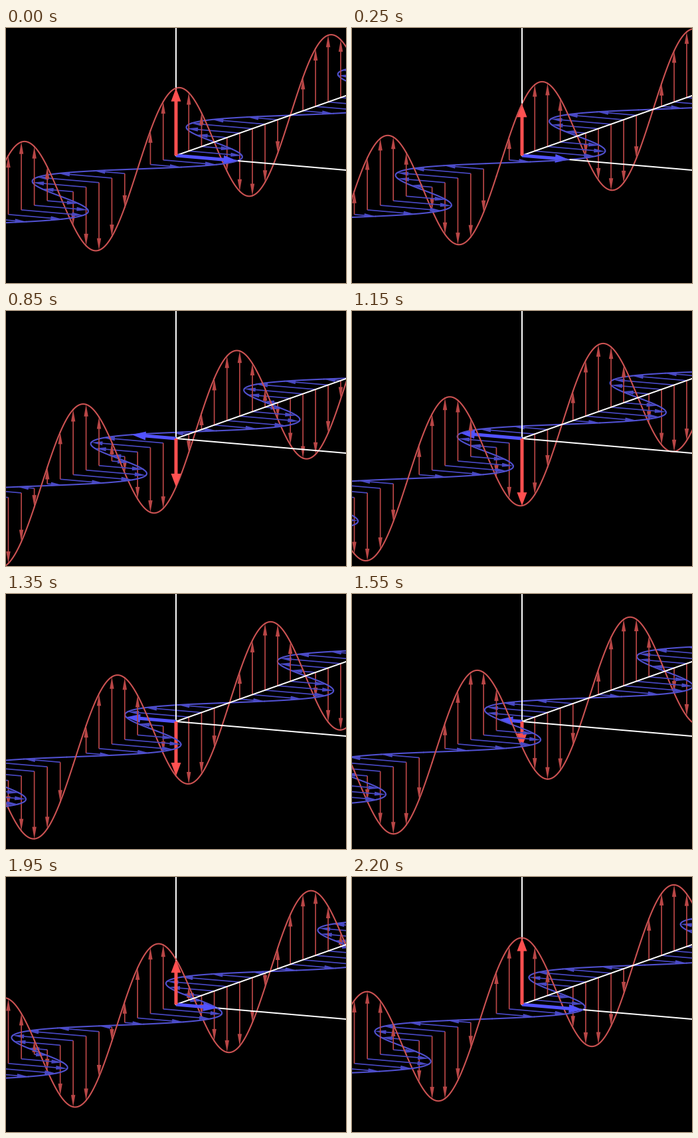
A matplotlib script for the animation above (2250 ms loop, 512 by 384 pixels).

```python
import numpy as np
import matplotlib.pyplot as plt
from matplotlib.animation import FuncAnimation
from matplotlib.patches import Polygon

W, H, DPI = 512, 384, 100
FRAMES, INTERVAL = 45, 50
PX = 72 / DPI                       # points per pixel

ORIGIN = np.array([W / 2, H / 2])
STEP = np.array([19.25, -6.77])     # travel axis, one twelfth of a wavelength
RED_DIR = np.array([0, -101.4])     # vertical field at full strength
BLUE_DIR = np.array([92.5, 8.0])    # sideways field at full strength
DEPTH = 0.00069                     # shrink per step away from the viewer
MIN_LEN = 0.2                       # weaker arrows are not drawn
CELLS = range(20, -21, -1)          # far to near

RED, RED_THIN, RED_BIG = "#cb5252", "#b94646", "#ff5050"
BLUE, BLUE_THIN, BLUE_BIG = "#5050cf", "#4848c2", "#5252ff"

fig = plt.figure(figsize=(W / DPI, H / DPI), dpi=DPI, facecolor="black")
ax = fig.add_axes([0, 0, 1, 1])
ax.set_xlim(0, W)
ax.set_ylim(H, 0)
ax.axis("off")


def project(n, offset):
    """Screen position of a point n steps along the axis, moved by offset."""
    scale = 1 / (1 + DEPTH * np.asarray(n, float))
    return ORIGIN + (np.multiply.outer(n, STEP) + offset) * scale[..., None]


def strength(n, frame):
    return np.cos(2 * np.pi * (np.asarray(n) / 12 - frame / FRAMES))


class Arrow:
    def __init__(self, n, direction, color, shaft, head, width, z):
        self.n, self.direction = n, direction
        self.shaft, self.head, self.width = shaft / 2, head, width / 2
        self.patch = ax.add_patch(
            Polygon(np.zeros((3, 2)), fc=color, ec="none", lw=0, zorder=z))

    def update(self, frame):
        s = strength(self.n, frame)
        self.patch.set_visible(abs(s) > MIN_LEN)
        if abs(s) <= MIN_LEN:
            return
        base = project(self.n, 0 * self.direction)
        tip = project(self.n, s * self.direction)
        along = (tip - base) / np.hypot(*(tip - base))
        side = np.array([-along[1], along[0]])
        neck = tip - along * self.head
        a, b = side * self.shaft, side * self.width
        self.patch.set_xy([base + a, neck + a, neck + b, tip,
                           neck - b, neck - a, base - a])


class Curve:
    def __init__(self, n, direction, color, z):
        self.n, self.direction = np.linspace(n, n + 1, 9), direction
        self.line, = ax.plot([], [], color=color, lw=2.1 * PX, zorder=z,
                             solid_capstyle="round", solid_joinstyle="round")

    def update(self, frame):
        offset = np.multiply.outer(strength(self.n, frame), self.direction)
        self.line.set_data(*project(self.n, offset).T)


parts = []
for n in CELLS:
    z = -n
    if n:
        parts.append(Arrow(n, BLUE_DIR, BLUE_THIN, 1.7, 17, 6, z))
        parts.append(Arrow(n, RED_DIR, RED_THIN, 1.7, 18, 6.4, z))
    parts.append(Curve(n, BLUE_DIR, BLUE, z))
    parts.append(Curve(n, RED_DIR, RED, z))

# Axes lie in front of the far half of the wave and behind the near half.
for end in [(256, -10), (522, 98.4), (522, 214.9)]:
    ax.plot(*zip(ORIGIN, end), color="white", lw=2 * PX, zorder=0.5)
parts.append(Arrow(0, BLUE_DIR, BLUE_BIG, 5, 21, 13, 0.6))
parts.append(Arrow(0, RED_DIR, RED_BIG, 5, 20, 15, 0.7))


def draw(frame):
    for part in parts:
        part.update(frame)
    return []


anim = FuncAnimation(fig, draw, frames=FRAMES, interval=INTERVAL,
                     repeat=True, repeat_delay=0)
plt.show()
```
